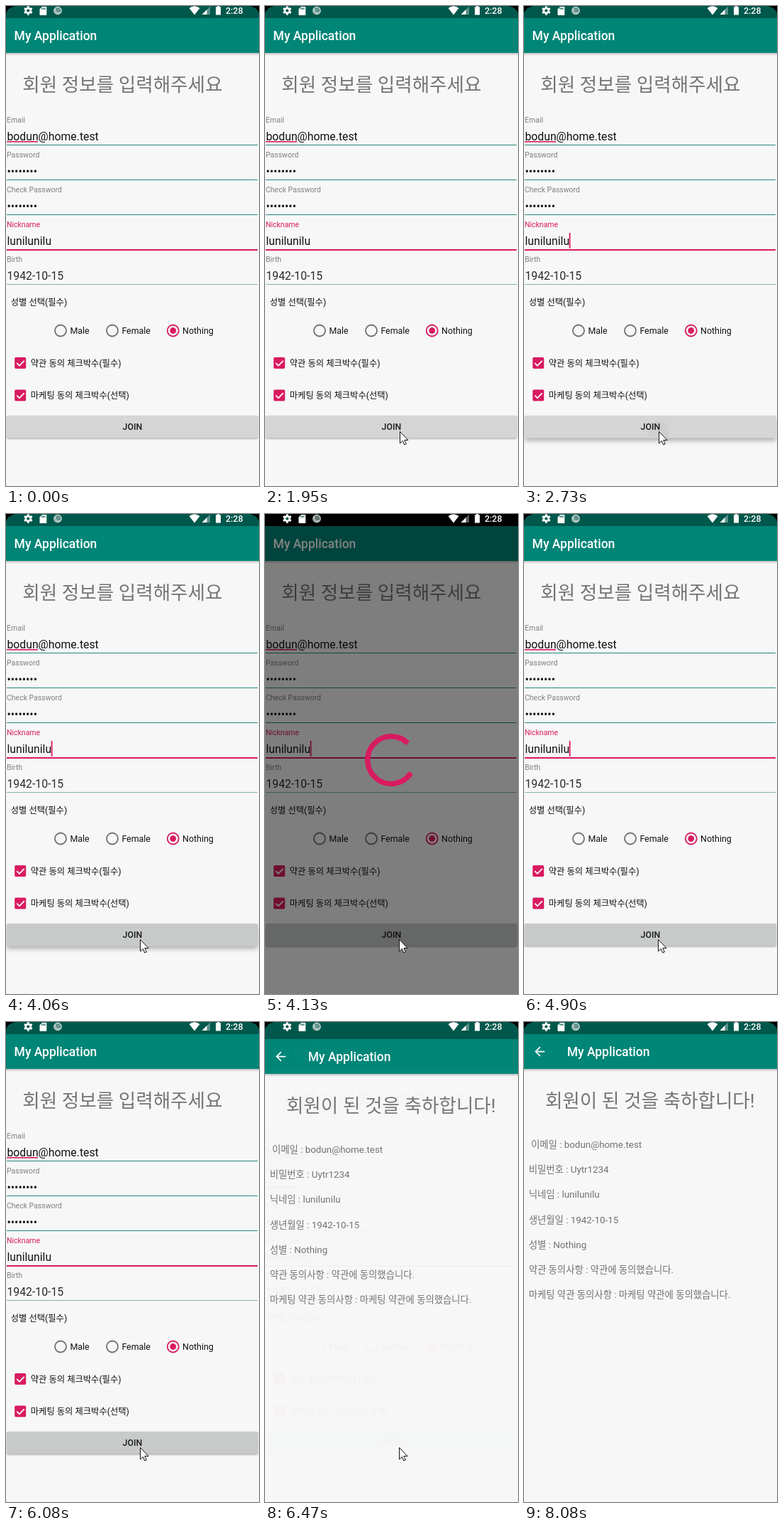
Write an HTML page that moves like this. It is 357 px wide and 675 px high and loops after 8.71 s.

```html
<!DOCTYPE html>
<html lang="ko">
<head>
<meta charset="utf-8">
<title>Sign-up form</title>
<style>
html, body { margin: 0; width: 100%; height: 100%; overflow: hidden; background: #f7f7f7; }
svg { display: block; width: 100%; height: 100%; }
text { font-family: Roboto, "Noto Sans CJK KR", "Noto Sans CJK", sans-serif; white-space: pre; }
</style>
</head>
<body>
<svg id="stage" viewBox="0 0 357 675" xmlns="http://www.w3.org/2000/svg"></svg>
<script>
const LOOP = 8710;
const PINK = '#d81b60', TEAL = '#008577', DARK = '#00574b', GREY = '#757575', PAPER = '#f7f7f7';
const LINE = '#23877d';
const MAIL = 'bodun@home.test', NICK = 'lunilunilu';

const text = (x, y, size, fill, s, weight = 400) =>
  `<text x="${x}" y="${y}" font-size="${size}" fill="${fill}" font-weight="${weight}">${s}</text>`;
const rect = (x, y, w, h, fill, more = '') =>
  `<rect x="${x}" y="${y}" width="${w}" height="${h}" fill="${fill}" ${more}/>`;

const appBar = (titleX) =>
  rect(0, 66, 357, 4, 'url(#shade)') + rect(0, 0, 357, 17, DARK) + rect(0, 17, 357, 49, TEAL) +
  text(titleX, 48, 17.5, '#fff', 'My Application', 500);

const field = (row, label, value, line = LINE, color = '#111', on = false) => {
  const y = Math.round(row * 49.1);
  return text(1, 163.7 + y, 10.5, on ? PINK : '#808080', label) +
    text(1.4, 189 + y, 15.8, color, value) +
    rect(1, 195 + y, 354, on ? 2 : 1, line);
};

const radio = (x, label, on) => {
  const color = on ? PINK : '#707070';
  return `<circle cx="${x}" cy="456.5" r="8" fill="none" stroke="${color}" stroke-width="1.8"/>` +
    (on ? `<circle cx="${x}" cy="456.5" r="4.4" fill="${color}"/>` : '') +
    text(x + 13.4, 461, 12.4, '#111', label);
};

const checkbox = (y, label) =>
  rect(12.2, y - 8, 16, 16, PINK, 'rx="1.8"') +
  `<path d="M15.3 ${y + .2}l3.6 3.6 6.8-7" fill="none" stroke="#fff" stroke-width="1.8"/>` +
  text(34.8, y + 4.7, 12.3, '#111', label);

const form = rect(0, 0, 357, 675, PAPER) + appBar(11.6) +
  text(23.2, 119.7, 26.6, GREY, '회원 정보를 입력해주세요') +
  field(0, 'Email', MAIL) + rect(1, 190, 44, 1.6, PINK) +
  field(1, 'Password', '•'.repeat(8)) +
  field(2, 'Check Password', '•'.repeat(8)) +
  field(3, 'Nickname', NICK, PINK, '#111', true) +
  field(4, 'Birth', '1942-10-15', '#7fb3ad', '#2b2b2b') +
  rect(63.7, 319, 1.8, 22, PINK, 'id="caret"') +
  text(6.8, 421, 12.3, '#111', '성별 선택(필수)') +
  radio(77, 'Male') + radio(150, 'Female') + radio(235.7, 'Nothing', true) +
  checkbox(502, '약관 동의 체크박수(필수)') +
  checkbox(547.5, '마케팅 동의 체크박수(선택)') +
  rect(1, 576, 354.5, 31.5, '#d5d5d5', 'rx="1.8" id="button"') +
  '<circle id="ripple" cx="190" cy="598" fill="#c8caca" clip-path="url(#face)"/>' +
  text(164.6, 596.4, 12.3, '#1c1c1c', 'JOIN', 500);

const rows = [' 이메일 : ' + MAIL, '비밀번호 : Uytr1234', '닉네임 : ' + NICK, '생년월일 : 1942-10-15',
  '성별 : Nothing', '약관 동의사항 : 약관에 동의했습니다.', '마케팅 약관 동의사항 : 마케팅 약관에 동의했습니다.'];
const done = rect(0, 0, 357, 675, PAPER) + appBar(60.8) +
  '<path transform="translate(11.7 31) scale(.875)" fill="#fff" d="M20 11H7.8l5.6-5.6L12 4l-8 8 8 8 1.4-1.4L7.8 13H20z"/>' +
  text(29.9, 119.7, 26.6, GREY, '회원이 된 것을 축하합니다!') +
  rows.map((s, i) => text(6.7, Math.round(176.6 + i * 35.3), 13.37, '#717171', s)).join('');

const teeth = [0, 60, 120].map(a => rect(-1.5, -6.3, 3, 12.6, '#fff', `rx=".6" transform="rotate(${a})"`)).join('');
const icons =
  `<g transform="translate(31.3 6.5)">${teeth}<circle r="3.4" fill="none" stroke="#fff" stroke-width="2.6"/><circle r="2.1" fill="${DARK}"/></g>` +
  '<path d="M51 1h5.5q.8 0 .8.8v10.4q0 .8-.8.8H48.3q-.8 0-.8-.8V4.5z" fill="#fff"/>' +
  [50.3, 52.3, 54.3].map(x => rect(x, 2.4, 1.1, 2.6, DARK)).join('') +
  '<circle cx="73" cy="6.5" r="5.2" fill="#9bb5b1" fill-opacity=".65" stroke="#d5e0de" stroke-width="1.2"/>' +
  '<path d="M70 4a4 4 0 0 0 6 5" fill="none" stroke="#e6eeec"/>' +
  '<path d="M258.5 3Q266 -2.5 273.5 3L266 12.5z" fill="#fff"/>' +
  '<path d="M288 .5V12H276.5z" fill="#fff" fill-opacity=".35"/><path d="M283.5 5V12H276.5z" fill="#fff"/>' +
  '<path d="M298 0h3v1.2h2V12.5h-7V1.2h2z" fill="#fff"/>' +
  text(309.9, 11, 12.5, '#fff', '2:28', 500);

const stage = document.getElementById('stage');
stage.innerHTML = `<defs>
  <linearGradient id="shade" x2="0" y2="1"><stop stop-color="#000" stop-opacity=".22"/><stop offset="1" stop-color="#000" stop-opacity="0"/></linearGradient>
  <clipPath id="face">${rect(1, 576, 354.5, 31.5, '#000', 'rx="1.8"')}</clipPath></defs>
  ${form}
  <g id="dim">${rect(0, 0, 357, 675, '#000')}</g>
  <g id="status">${rect(0, 0, 357, 17, '#000')}</g>
  <path id="spinner" fill="none" stroke="${PINK}" stroke-width="7.4"/>
  <g id="done">${done}</g>
  ${icons}
  <path d="M0 0H13Q3 2 0 10zM357 0H344Q354 2 357 10z"/>
  <path id="cursor" d="M0 0V16.5L3.8 13 6.3 18.5 8.8 17.4 6.3 12H11.5z" fill="#fff" stroke="#111" stroke-linejoin="round"/>`;

const parts = Object.fromEntries(
  ['caret', 'button', 'ripple', 'dim', 'status', 'spinner', 'done', 'cursor']
    .map(id => [id, document.getElementById(id)]));
const show = (part, on) => part.setAttribute('visibility', on ? 'visible' : 'hidden');
const within = (t, a, b) => t >= a && t < b;
const clamp = v => Math.min(1, Math.max(0, v));
const smooth = v => v * v * (3 - 2 * v);

// Latest of the given moments that has passed.
const lastStep = (t, steps) => steps.filter(s => s <= t).pop() ?? steps[0];

function arc(from, to) {
  const point = deg => {
    const a = deg * Math.PI / 180;
    return `${178 + 33.3 * Math.cos(a)} ${346 + 33.3 * Math.sin(a)}`;
  };
  return `M${point(from)}A33.3 33.3 0 ${to - from > 180 ? 1 : 0} 1 ${point(to)}`;
}

function cursorAt(t) {
  if (t < 1950) {
    const p = clamp(Math.floor((t - 1400) / 78.6) / 6);
    const rest = (1 - p) ** 2;
    return [190.5 + 129 * rest, 598.5 + 66 * rest];
  }
  if (t < 2880) return [190.5, 598.5];
  return t < 8010 ? [189.5, 598.5] : [238.5, 637.5];
}

function drawLoading(t) {
  const on = within(t, 4130, 4900);
  [parts.dim, parts.status, parts.spinner].forEach(p => show(p, on));
  if (!on) return;
  const now = t < 4220 ? 4130 : 4220 + Math.floor((t - 4220) / 75.6) * 75.6;
  const fade = clamp((4900 - now) / 180);
  parts.dim.setAttribute('opacity', (now < 4220 ? .49 : .6) * fade);
  parts.status.setAttribute('opacity', fade);
  parts.spinner.setAttribute('opacity', fade);
  const age = now - 4130;
  const turn = age * .23;
  const tail = 33 + turn + 270 * smooth(clamp(age / 667));
  parts.spinner.setAttribute('d', arc(tail, 315 + turn));
}

function drawDone(t) {
  show(parts.done, t >= 6380);
  if (t < 6380) return;
  const age = lastStep(t, [6380, 6470, 6550, 6610]) - 6380;
  const drop = age < 230 ? Math.round(20 * Math.exp(-age / 86)) : 0;
  parts.done.setAttribute('transform', `translate(0 ${drop})`);
  parts.done.setAttribute('opacity', Math.min(1, .5 + age / 90 * .472));
}

function draw(t) {
  show(parts.caret, within(t, 410, 960) || within(t, 1480, 1950) || within(t, 2420, 6080));

  const raised = within(t, 2730, 4130);
  parts.button.setAttribute('fill', t < 4060 ? '#d5d5d5' : '#c8caca');
  parts.button.style.filter = raised
    ? 'drop-shadow(0 4px 3px rgba(0,0,0,.28))'
    : 'drop-shadow(0 1px 1px rgba(0,0,0,.35))';
  show(parts.ripple, within(t, 2340, 4060));
  parts.ripple.setAttribute('r', 5 + 10 * clamp((t - 2340) / 160));
  parts.ripple.setAttribute('opacity', .5);

  drawLoading(t);
  drawDone(t);

  show(parts.cursor, within(t, 1400, 8080));
  parts.cursor.setAttribute('transform', `translate(${cursorAt(t).join(' ')})`);
}

const start = performance.now();
function tick() {
  draw((performance.now() - start) % LOOP);
  requestAnimationFrame(tick);
}
tick();
</script>
</body>
</html>
```
